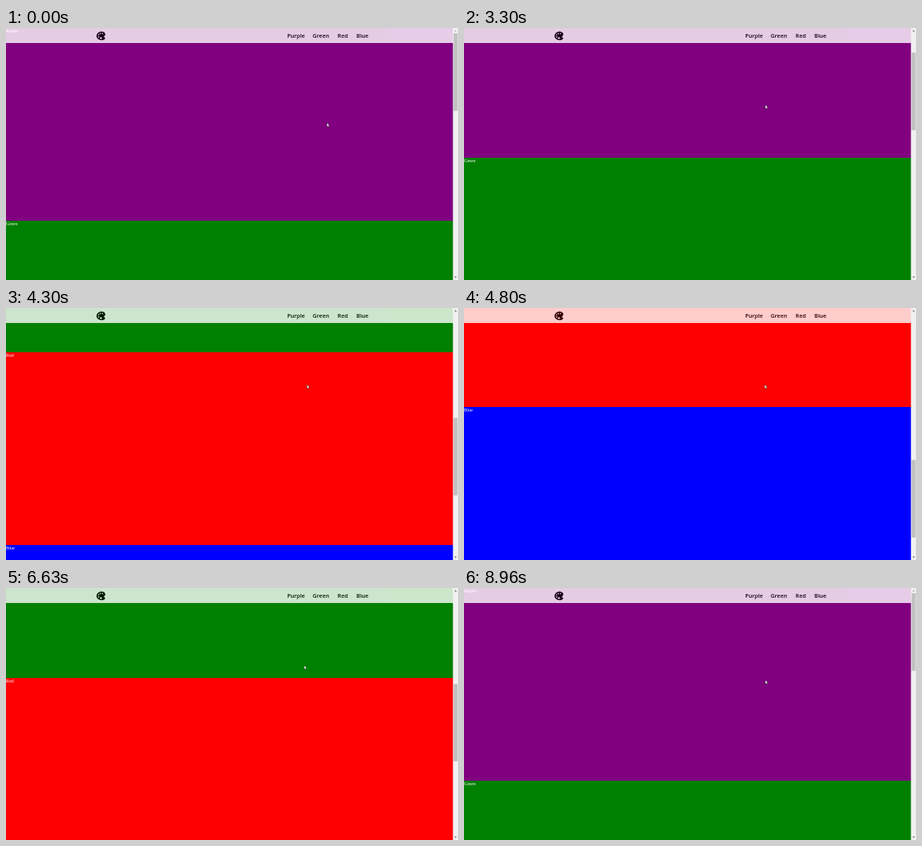
Write an HTML page that moves like this. It is 600x336 px and loops after 9000 ms.

```html
<!DOCTYPE html>
<html lang="en">
<head>
<meta charset="utf-8">
<title>Color scroll</title>
<style>
  html, body { margin: 0; width: 100%; height: 100%; overflow: hidden; }
  #stage { position: relative; width: 600px; height: 336px; overflow: hidden; background: #fff; }
  #page { position: absolute; left: 0; width: 594px; }
  section { height: 257.2px; color: #fff; font: 6.25px "Liberation Serif", serif; }
  h1 { margin: 0; font: bold 8px/19.6px "Liberation Serif", serif; text-align: center; }
  nav { position: absolute; top: 0; left: 0; width: 594px; height: 20px; background: #fff; opacity: .8; }
  nav div { position: absolute; left: 368px; display: flex; }
  nav span { height: 20px; text-align: center; font: 600 7.5px/20.6px "Open Sans", sans-serif; }
  svg { position: absolute; top: 0; left: 0; }
</style>
</head>
<body>
<div id="stage">
  <div id="page">
    <section style="background:purple">Purple</section>
    <section style="background:green">Green</section>
    <section style="background:red">Red</section>
    <section style="background:blue">Blue</section>
    <h1>The End</h1>
  </div>
  <nav>
    <svg width="140" height="20">
      <g transform="translate(118.9 3.3) scale(.0278)">
        <path d="M441 336C425 321 407 326 393 317Q383 307 393 297L424 270C478 222 478 145 424 97C340 23 200 38 116 112C25 192 25 324 116 405C206 484 360 479 441 408C461 390 461 355 441 336z"/>
        <g fill="#fff">
          <circle cx="144" cy="208" r="32"/><circle cx="152" cy="311" r="32"/>
          <circle cx="224" cy="144" r="32"/><circle cx="328" cy="144" r="32"/>
          <circle cx="256" cy="367" r="48"/>
        </g>
      </g>
    </svg>
    <div>
      <span style="width:34px">Purple</span>
      <span style="width:32px">Green</span>
      <span style="width:26px">Red</span>
      <span style="width:26px">Blue</span>
    </div>
  </nav>
  <svg width="600" height="336">
    <path fill="#f1f1f1" d="M593.3 0H600V336H593.3z"/>
    <rect id="thumb" x="594.2" width="5.2" height="103.5" fill="#c1c1c1"/>
    <path id="up" d="M595.3 4.4l1.5-1.7 1.5 1.7z"/>
    <path id="down" d="M595.3 331.5l1.5 1.7 1.5-1.7z"/>
    <g id="mouse" fill="#fff" stroke="#000" stroke-width=".35">
      <path id="arrow" d="M0 0V5L1.1 4 1.9 5.7 2.7 5.3 2 3.7H3.5z"/>
      <path id="hand" d="M-.5.2Q0-.3.5.2V2.2L2.6 2.7Q3.1 2.9 3 3.6L2.5 6.2H-.3L-1.8 3.7Q-1.6 2.9-.5 3.7z"/>
    </g>
  </svg>
</div>
<script>
const $ = id => document.getElementById(id);
const items = document.querySelectorAll("nav span");
const LOOP = 9000, MAX = 705.6, REST = 335, BACK = 165, FADE = 260;

// Mouse stops: time, x, y
const stops = [
  [930, 426, 126.5], [1700, 345, 11], [1830, 364, 10], [2100, 477, 10], [2500, 484, 11],
  [2800, 430, 60], [2960, 400.2, 102.5], [6260, 398.4, 102], [7030, 393, 104.5],
  [7800, 391, 112.7], [8880, 391, 112.7], [8960, 400, 122.8]
];

// 0 to 1 between two times; power above 1 slows the end
const ramp = (t, from, to, power = 1) =>
  1 - (1 - Math.min(1, Math.max(0, (t - from) / (to - from)))) ** power;

const gray = v => `rgb(${v},${v},${v})`;

const scrollAt = t =>
  REST * ramp(t, 3080, 3960) +
  (MAX - REST) * ramp(t, 4030, 5100, 1.35) -
  (MAX - BACK) * ramp(t, 6260, 7050, 1.35) -
  BACK * ramp(t, 7190, 7800, 1.35);

function mouseAt(t) {
  let [, x, y] = stops[0];
  for (let i = 1; i < stops.length; i++) {
    const [start, x0, y0] = stops[i - 1], [end, x1, y1] = stops[i];
    const u = ramp(t, start, end);
    x += (x1 - x0) * u;
    y += (y1 - y0) * u;
  }
  return [x, y];
}

// The mouse sweeps the items 60 ms apart and stays on the last one
function hoverAt(t, i) {
  const enter = 1840 + 60 * i, leave = i < 3 ? enter + 60 : 2520;
  return ramp(t, enter, enter + FADE) * (1 - ramp(t, leave, leave + FADE)) ** 2;
}

function draw(now) {
  const t = now % LOOP, y = scrollAt(t), [mx, my] = mouseAt(t);
  $("page").style.top = -y + "px";
  $("thumb").setAttribute("y", 7 + y * .306);
  $("up").setAttribute("fill", y > .1 ? "#505050" : "#a3a3a3");
  $("down").setAttribute("fill", y < MAX - .1 ? "#505050" : "#a3a3a3");

  items.forEach((el, i) => {
    const level = hoverAt(t, i);
    el.style.background = gray(255 * (1 - level));
    el.style.color = gray(217 * level);
  });

  const over = mx > 368 && mx < 486 && my < 20;
  $("mouse").setAttribute("transform", `translate(${mx} ${my})`);
  $("hand").style.display = over ? "" : "none";
  $("arrow").style.display = over ? "none" : "";
  requestAnimationFrame(draw);
}
requestAnimationFrame(draw);
</script>
</body>
</html>
```
